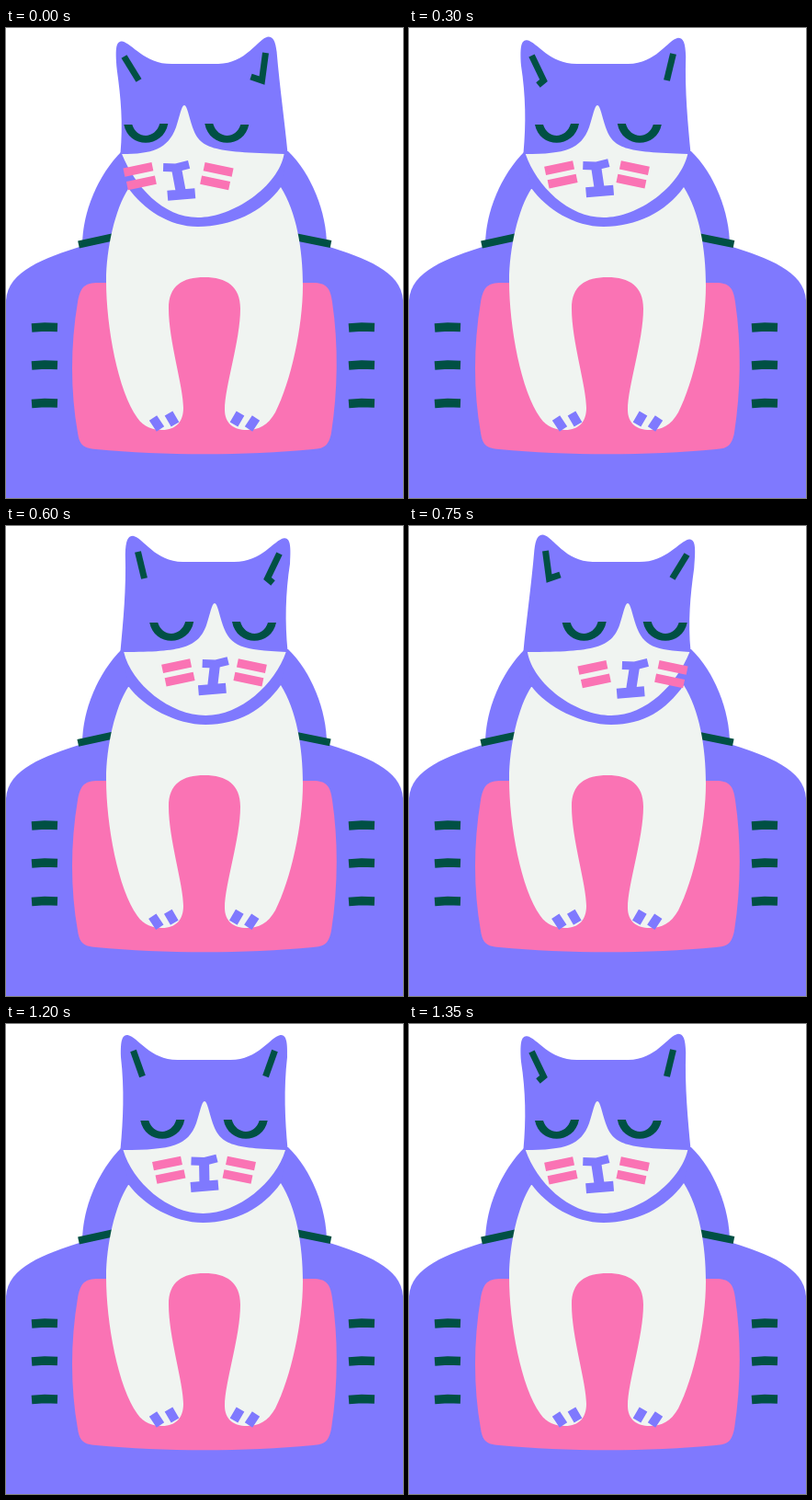
Write an HTML page that moves like this. It is 432 px wide and 511 px high and loops after 1.5 s.

```html
<!DOCTYPE html>
<html lang="en">
<head>
<meta charset="utf-8">
<title>Sleepy cat</title>
<style>
  html, body { margin: 0; width: 100%; height: 100%; overflow: hidden; background: #fff; }
  svg { display: block; width: 100%; height: 100%; }
  .purple { fill: #7f79fe; }
  .pink { fill: #fa73b4; }
  .green { fill: #005044; }
  .white { fill: #f0f4f1; }
  .line { fill: none; }
  .purple.line { stroke: #7f79fe; }
  .pink.line { stroke: #fa73b4; }
  .green.line { stroke: #005044; }
</style>
</head>
<body>
<svg viewBox="0 0 432 511">
  <path class="purple" d="M126,134 C100,160 83,200 83,237 H349 C349,200 332,158 307,134Z"/>
  <path class="purple" d="M0,296 C2,264 42,250 83,237 H349 C390,250 430,264 432,296 V511 H0Z"/>
  <path class="pink" d="M98,277 H177 V270 H255 V277 H334 C349,277 353,283 355,298 C362,345 361,395 354,440 C351,455 346,457 334,458 C260,465 172,465 98,458 C84,457 80,453 78,440 C70,395 70,345 78,298 C81,283 84,278 98,277Z"/>
  <g id="stripes"></g>
  <path class="green line" id="arms" stroke-width="8" d="M79,235.5 L118,227 M314,227 L353.5,235"/>
  <path class="white" d="M133,175 C119,196 109,240 109,275 C109,325 122,395 143,424 C150,434 160,437 170,437 C185,437 193,428 193,413 C193,390 177,340 177,305 C177,280 192,271 216,271 C240,271 255,281 255,305 C255,340 238,390 238,415 C238,430 248,437 262,437 C275,437 285,432 293,418 C310,385 323,325 323,280 C323,240 316,200 299,173Z"/>
  <path class="purple line" id="toes" stroke-width="10" d="M160,424 l8,12 M177,419 l7,12 M272,424 l-8,12 M255,419 l-7,12"/>
  <g id="head"></g>
</svg>
<script>
const $ = id => document.getElementById(id);
const fill = (color, d) => `<path class="${color}" d="${d}"/>`;
const line = (color, width, d) => `<path class="${color} line" stroke-width="${width}" d="${d}"/>`;

// The head turns in whole steps s from -2 (left) to 2 (right).
// Its right half is the left half of the opposite turn, mirrored.
const bothSides = (part, s) => part(s) + `<g transform="matrix(-1 0 0 1 431 0)">${part(-s)}</g>`;

function ear(s) {
  const x = 132.5 + 4.9 * s + 0.9 * s * s, y = 12 - 1.2 * s;
  return fill('purple', `M217,136 H124.5 C127.5,104 ${129 + 2 * s},${71 - 2.5 * s} ${x - 7.5 - s},${36 - 5 * s}
    C${x - 8},${y + 5} ${x - 6},${y} ${x},${y} C${x + 11},${y + 2} ${x + 24},39 ${x + 54},39 H217Z`);
}

function features(s) {
  const hook = (s + 1) % 3 === 0 ? `l${6 * s},${2 - 3 * s}` : '';
  const x = 170.3 + 9.6 * s + 0.3 * s * s;
  const wx = 175.5 + 10 * s + s ** 3 - 0.9 * s * s, wy = 151.5 + 0.6 * s * s;
  const whisker = (x, y) => `M${x - 15.5},${y + 3.2} l31,-6.4`;
  return line('green', 7, `M${138.5 + 5 * s},${29 - s} L${148.5 + 2 * s},57 ${hook}`)
    + fill('green', `M${x - 24},105 C${x - 19},131.5 ${x + 19},131.5 ${x + 24},104
      H${x + 15} C${x + 10},121 ${x - 10},121 ${x - 15},105Z`)
    + line('pink', 9.5, whisker(wx, wy) + whisker(wx + 3.5, wy + 14.5));
}

function face(s) {
  const peak = 216 + 11 * s, chin = 214.5 + 2.8 * s;
  const l = 127.5 + 0.7 * s, r = 304 + 0.7 * s;
  return fill('white', `M${l},137 C${peak - 35},137 ${peak - 18},132 ${peak - 9},108
    C${peak - 5},96 ${peak - 3},84 ${peak},84 C${peak + 3},84 ${peak + 5},96 ${peak + 9},108
    C${peak + 17},131 ${peak + 30},135 ${r},137
    C${r - 10 - 2 * s},172 ${chin + 38},206 ${chin},206 C${chin - 38},206 ${l + 10 - 2 * s},172 ${l},137Z`);
}

function collar(s) {
  const chin = 214.5 + 2.8 * s;
  return fill('purple', `M126,134 L133,174 C150,197 ${chin - 32},216 ${chin},216
    C${chin + 35},216 280,200 299,173 L307,134Z`);
}

function nose(s) {
  const x = 215.5 + 11.2 * s + s ** 3, y = 148 + 0.6 * s * s;
  const footX = 216 + 7 * s + 1.4 * s ** 3, footY = 176 + 1.2 * s * s;
  return line('purple', 9, `M${x - 14},${y + 1} L${x},${y + 1.5} ${x + 14},${y - 2}`)
    + line('purple', 11, `M${x},${y} L${footX},${footY} M${footX - 15},${footY + 1.5} l30,-2.5`);
}

function show(s) {
  $('head').innerHTML = collar(s) + bothSides(ear, s) + face(s) + bothSides(features, s) + nose(s);
  const nudge = s > 0 ? 'translate(-.7 .3)' : '';
  $('arms').setAttribute('transform', nudge);
  $('toes').setAttribute('transform', nudge);
}

for (const x of [28, 373])
  for (const y of [325.5, 366.5, 408])
    $('stripes').innerHTML += line('green', 9.5, `M${x},${y + 0.5} l14,-1 14,.5`);

// The sway follows a cosine, rounded to a whole turn every 150 ms
let start, turn;
function tick(now) {
  start ??= now;
  const step = Math.floor((now - start) % 1500 / 150);
  const s = Math.round(-2.2 * Math.cos((step - 0.5) * Math.PI / 5));
  if (s !== turn) show(turn = s);
  requestAnimationFrame(tick);
}
show(turn = -2);
requestAnimationFrame(tick);
</script>
</body>
</html>
```
